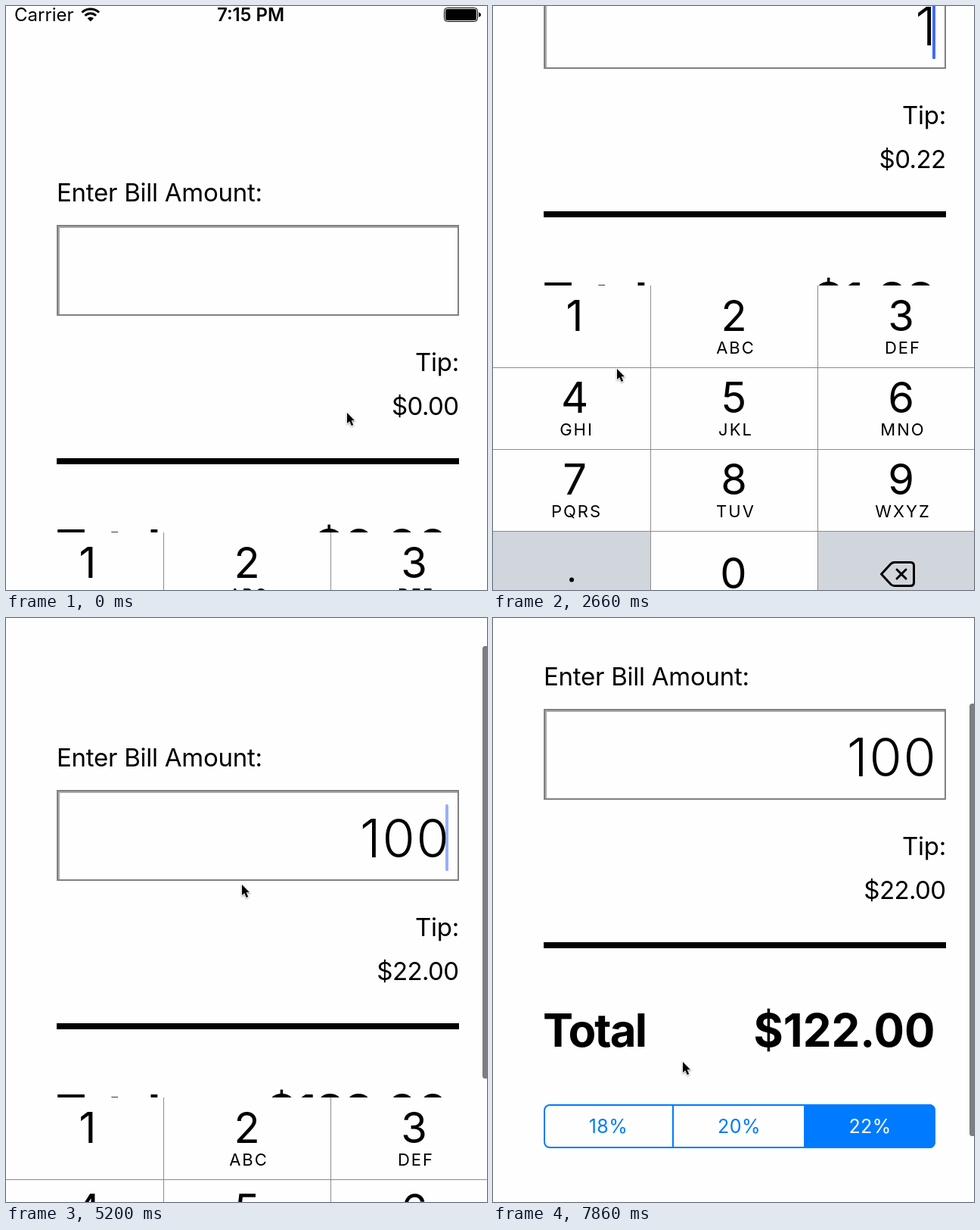
Animation of 636x771 px, one loop 8 s. Source, as an HTML page:

```html
<!DOCTYPE html>
<html lang="en">
<head>
<meta charset="utf-8">
<title>Tip calculator</title>
<style>
  html, body { margin: 0; width: 100%; height: 100%; overflow: hidden; background: #fefefe; }
  svg { display: block; width: 100vw; height: 100vh; font-family: Inter, sans-serif; }
  .body { font-size: 33px; letter-spacing: -.25px; }
  .money { letter-spacing: -.6px; }
  .bill { font-size: 70px; font-weight: 300; letter-spacing: 1.8px; }
  .total { font-size: 60px; font-weight: 700; }
  .status { font-size: 24px; }
  .digit { font-size: 56px; }
  .letters { font-size: 22px; letter-spacing: 2px; }
  .segment { font-size: 25px; letter-spacing: .4px; fill: #007aff; }
  .end { text-anchor: end; }
  .mid { text-anchor: middle; }
  #pointer { filter: drop-shadow(0 1px 1px #0006); }
</style>
</head>
<body>
<svg viewBox="0 0 636 771" xmlns="http://www.w3.org/2000/svg">
  <g id="page">
    <g class="status">
      <text x="11" y="20">Carrier</text>
      <path d="M100.500 8.500a16 16 0 0 1 22.500 0M104.500 12.800a10.300 10.300 0 0 1 14.500 0" fill="none" stroke="#000" stroke-width="3"/>
      <path d="M111.800 20.500l-4.200-4.300a6 6 0 0 1 8.400 0z"/>
      <text class="mid" x="323.500" y="20" font-weight="600">7:15 PM</text>
      <rect x="579.500" y="2.500" width="44" height="18" rx="4" fill="none" stroke="#000"/>
      <rect x="581" y="4" width="41" height="15" rx="2.500"/>
      <path d="M625 8.500q3 .5 3 3t-3 3z"/>
    </g>

    <text class="body" x="67" y="258">Enter Bill Amount:</text>
    <path d="M70 407V292H597" fill="none" stroke="#aaa" stroke-width="2"/>
    <rect x="68" y="290" width="530" height="118" fill="none" stroke="#808080" stroke-width="2"/>
    <text id="bill" class="bill end" x="587.500" y="378"></text>
    <rect id="caret" x="581" y="308" width="4" height="88" rx="1.500" fill="#426bf2"/>

    <text class="body end" x="599" y="482">Tip:</text>
    <text id="tip" class="body money end" x="598.500" y="540"></text>
    <rect x="67" y="597" width="532" height="8"/>
    <text class="total" x="66" y="734.500" letter-spacing="-1.900">Total</text>
    <text id="total" class="total end" x="584.500" y="734.500"></text>

    <path d="M411 811H577a8 8 0 0 1 8 8V861a8 8 0 0 1-8 8H411z" fill="#007aff"/>
    <rect x="68" y="812" width="516" height="56" rx="7" fill="none" stroke="#007aff" stroke-width="2"/>
    <path d="M238 812V868" stroke="#007aff" stroke-width="2"/>
    <g class="segment mid">
      <text x="152.500" y="849">18%</text>
      <text x="325.500" y="849">20%</text>
      <text x="498.500" y="849" fill="#fff">22%</text>
    </g>

    <g id="keyboard">
      <rect y="695" width="636" height="432" fill="#fefefe"/>
      <path d="M0 1019H208V1127H0zM430 1019H636V1127H430z" fill="#d1d5dc"/>
      <path d="M208.500 695V1127M429.500 695V1127M0 803.500H636M0 911.500H636M0 1019.500H636" stroke="#8c8c8c"/>
      <g id="keys" class="mid"></g>
      <circle cx="104" cy="1083.500" r="3"/>
      <g fill="none" stroke="#000" stroke-width="3" stroke-linejoin="round" stroke-linecap="round">
        <path d="M513.500 1076L526 1062.500q2-2 5-2H552q4.500 0 4.500 4.500V1087q0 4.500-4.500 4.500H531q-3 0-5-2z"/>
        <path d="M534 1070l12 12m0-12l-12 12"/>
      </g>
    </g>
  </g>
  <rect id="scrollbar" x="630" width="10" height="571" rx="3.500" fill-opacity=".5"/>
  <path id="pointer" d="M0 0V14L3.200 11.200L5.800 17L8.200 16L5.700 10.300H10Z" stroke="#fff" stroke-width="1.500" paint-order="stroke"/>
</svg>
<script>
const LOOP = 8000, TICKS = 54, TICK = LOOP / TICKS;   // each picture is held for one tick
const el = id => document.getElementById(id);
const clamp = v => Math.max(0, Math.min(1, v));

// Eased progress from 0 at tick `start` to 1 at tick `end`.
function glide(tick, start, end) {
  const p = clamp((tick - start) / (end - start));
  return p * p * (3 - 2 * p);
}

// Each move eases from wherever the value is to its own goal.
const follow = (tick, value, moves) => moves.reduce(
  (v, { start, end, goal }) => v + (goal - v) * glide(tick, start, end), value);

const scrolls = [
  { start: 1.31, end: 9, goal: 208 },
  { start: 10.5, end: 12.5, goal: 326 },
  { start: 29, end: 32, goal: 322 },
  { start: 32, end: 36.17, goal: 0 },
  { start: 45, end: 48.3, goal: 70 },
  { start: 50, end: 53, goal: 169 },
];
const pointerMoves = [
  { start: 13, end: 17, x: 164, y: 479 },
  { start: 20, end: 21, x: 317, y: 752 },
  { start: 23, end: 28, x: 312, y: 352 },
  { start: 39, end: 42, x: 251, y: 586 },
];
const keyPresses = [17, 21, 22];
const pointerAxis = (tick, axis, from) =>
  follow(tick, from, pointerMoves.map(m => ({ ...m, goal: m[axis] })));

function buildKeys() {
  const groups = ["", "ABC", "DEF", "GHI", "JKL", "MNO", "PQRS", "TUV", "WXYZ"];
  const text = (kind, x, y, value) => `<text class="${kind}" x="${x}" y="${y}">${value}</text>`;
  el("keys").innerHTML = groups.map((group, i) => {
    const x = 108 + 215.5 * (i % 3) - (i % 3 === 1 ? 5 : 0) + (i % 3 === 2 ? .5 : 0);
    const y = 755 + 108 * Math.floor(i / 3);
    return text("digit", x, y, i + 1) + text("letters", x + 2.5, y + 30, group);
  }).join("") + text("digit", 318, 1095, 0);
}

// The bar shows while scrolling and fades a moment after it ends.
const barOpacity = tick => Math.max(...scrolls.map(
  ({ start, end }) => tick > start ? clamp((end + 5 - tick) / 2) : 0));

// Solid while typing, then blinking until the keyboard leaves.
function caretOpacity(tick) {
  if (tick < 17 || tick >= 42) return 0;
  if (tick < 24) return 1;
  return clamp(1.2 * Math.cos((tick * TICK - 330) * 2 * Math.PI / 1000) - .2);
}

function draw(now) {
  const tick = Math.floor((now % LOOP + 25) / TICK) % TICKS;
  const bill = "100".slice(0, keyPresses.filter(press => tick >= press).length);
  const scroll = Math.round(follow(tick, 0, scrolls));
  const place = (id, x, y) => el(id).setAttribute("transform", `translate(${Math.round(x)} ${Math.round(y)})`);
  const fade = (id, opacity) => el(id).setAttribute("opacity", opacity);

  el("bill").textContent = bill;
  el("tip").textContent = "$" + (bill * .22).toFixed(2);
  el("total").textContent = "$" + (bill * 1.22).toFixed(2);
  place("page", 0, -scroll);
  place("keyboard", 0, 432 * glide(tick, 41, 44));
  place("scrollbar", 0, .708 * scroll - 7);
  place("pointer", pointerAxis(tick, "x", 451), pointerAxis(tick, "y", 537));
  fade("caret", caretOpacity(tick));
  fade("scrollbar", barOpacity(tick));
  fade("pointer", tick === 19 || tick === 20 ? 0 : 1);   // typing hides the pointer
  requestAnimationFrame(draw);
}

buildKeys();
requestAnimationFrame(draw);
</script>
</body>
</html>
```
